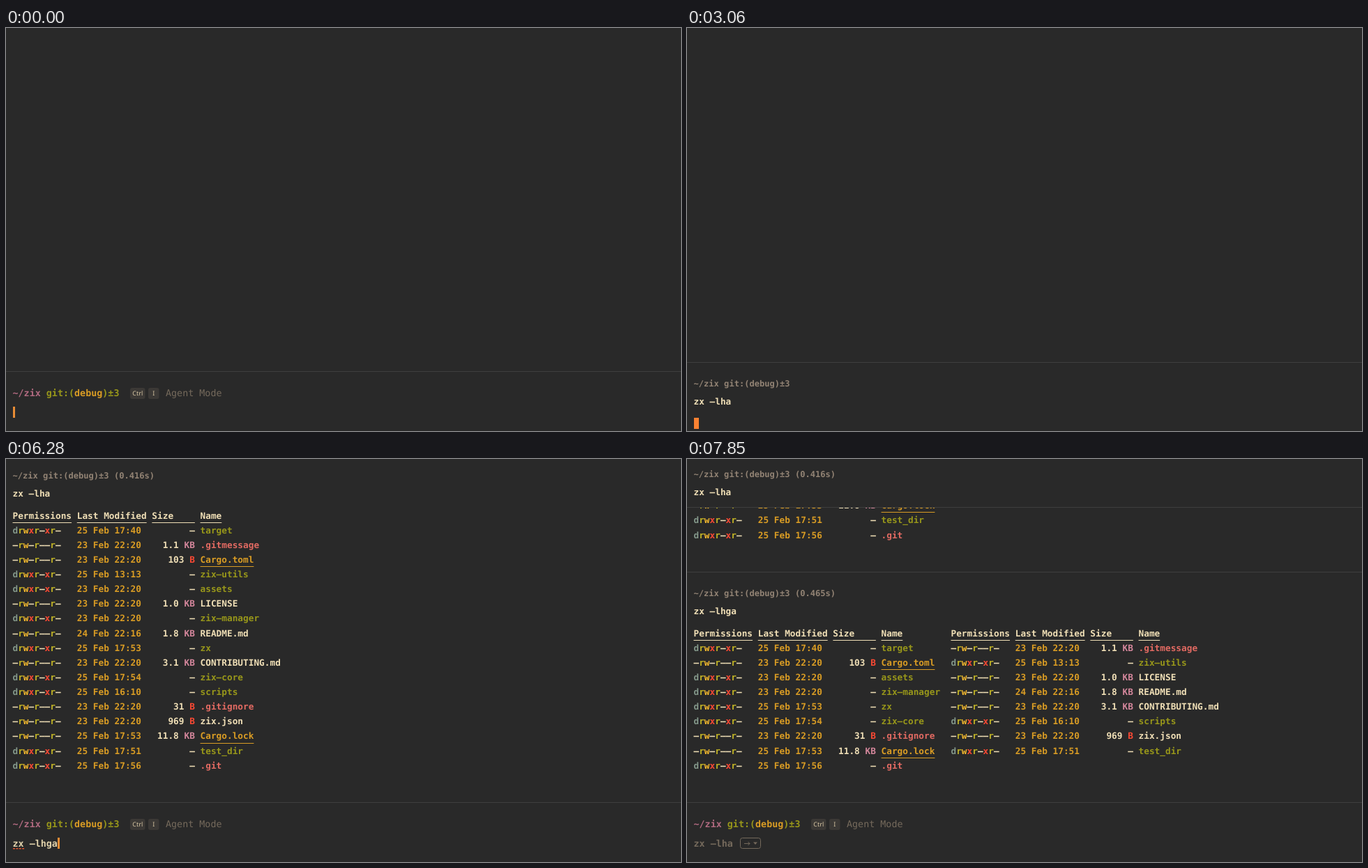
An HTML page with a canvas for the animation above (8 s loop, 968 px wide and 579 px high).

```html
<!DOCTYPE html>
<html lang="en">
<head>
<meta charset="utf-8">
<title>Terminal</title>
<style>
html, body { margin: 0; width: 100%; height: 100%; overflow: hidden; background: #292929; }
canvas { display: block; width: 100vw; height: 100vh; }
</style>
</head>
<body>
<canvas id="stage" width="968" height="579"></canvas>
<script>
const ctx = document.getElementById('stage').getContext('2d');
const W = 968, H = 579, LOOP = 8000, LEFT = 9.5;
const ROW = 21.12, CELL = 7.687, INPUT_CELL = 8.05;
const INPUT_TOP = 493, HEAD = 88, STICKY = 69;
const BG = '#292929', LINE = '#3e3e3e', CREAM = '#f0dfb6', GREY = '#756a5c', TITLE = '#928374',
  GOLD = '#d99c24', OLIVE = '#98971a', RED = '#fb4934', SALMON = '#e26a62', PINK = '#d3869b',
  MAUVE = '#b16a80', ORANGE = '#e88c35';
const PERM = { d: '#83978a', r: '#bdb026', w: '#f5ba2e', x: RED, '-': CREAM };

const files = `d|25 Feb 17:40|-|target
-|23 Feb 22:20|1.1 KB|.gitmessage
-|23 Feb 22:20|103 B|Cargo.toml
d|25 Feb 13:13|-|zix-utils
d|23 Feb 22:20|-|assets
-|23 Feb 22:20|1.0 KB|LICENSE
d|23 Feb 22:20|-|zix-manager
-|24 Feb 22:16|1.8 KB|README.md
d|25 Feb 17:53|-|zx
-|23 Feb 22:20|3.1 KB|CONTRIBUTING.md
d|25 Feb 17:54|-|zix-core
d|25 Feb 16:10|-|scripts
-|23 Feb 22:20|31 B|.gitignore
-|23 Feb 22:20|969 B|zix.json
-|25 Feb 17:53|11.8 KB|Cargo.lock
d|25 Feb 17:51|-|test_dir
d|25 Feb 17:56|-|.git`.split('\n').map(s => s.split('|'));

const rect = (x, y, w, h, color) => { ctx.fillStyle = color; ctx.fillRect(x, y, w, h); };
const rule = y => rect(0, Math.round(y), W, 1, LINE);

// Monospaced text on a fixed grid, centred vertically on y
function mono(s, x, y, color, cell = CELL, weight = 'bold') {
  const size = cell / 0.602;
  ctx.font = `${weight} ${size}px "DejaVu Sans Mono", monospace`;
  ctx.fillStyle = color;
  const base = Math.round(y + size * 0.364);
  [...s].forEach((c, i) => {
    if (c !== ' ') ctx.fillText(c === '-' ? '–' : c, x + i * cell, base);
  });
}

const put = (s, col, y, color) => mono(s, LEFT + col * CELL, y, color);
const underline = (col, n, y, color) =>
  rect(LEFT + col * CELL, Math.round(y + 9.8), n * CELL, 1, color);

function header(col, y) {
  [['Permissions', 0, 11], ['Last Modified', 12, 13], ['Size', 26, 8], ['Name', 35, 4]]
    .forEach(([s, c, n]) => {
      put(s, col + c, y, CREAM);
      underline(col + c, n, y, CREAM);
    });
}

function entry([kind, date, size, name], col, y) {
  const dir = kind === 'd', cargo = name.startsWith('Cargo');
  [...(dir ? 'drwxr-xr-' : '-rw-r--r-')].forEach((c, i) => put(c, col + i, y, PERM[c]));
  put(date, col + 12, y, GOLD);
  const [num, unit = ''] = size.split(' ');
  put(num, col + 34 - size.length, y, CREAM);
  put(unit, col + 34 - unit.length, y, unit === 'B' ? RED : PINK);
  put(name, col + 35, y, name[0] === '.' ? SALMON : dir ? OLIVE : cargo ? GOLD : CREAM);
  if (cargo) underline(col + 35, name.length, y, GOLD);
}

const rowsIn = cols => Math.ceil(files.length / cols);
const doneTop = (bottom, cols) => bottom - 53 - rowsIn(cols) * ROW - HEAD;
const runTop = (cols, out) => 568 - (out ? (rowsIn(cols) + 2) * ROW : 0) - HEAD;

function block(top, cmd, cols, out, time) {
  const y = top + HEAD;
  if (out) {
    for (let c = 0; c < cols; c++) header(c * 48, y);
    files.forEach((f, i) => entry(f, i % cols * 48, y + (1 + Math.floor(i / cols)) * ROW));
  }
  let titleY = top + 30.5;
  if (top < -9) {
    rect(0, 0, W, STICKY, BG);
    rule(STICKY);
    titleY = 21.5;
  } else rule(top);
  mono('~/zix git:(debug)±3' + (time ? ` (${time})` : ''), LEFT, titleY, TITLE, 7.27);
  put(cmd, 0, titleY + 26, CREAM);
}

function key(s, x, w) {
  ctx.fillStyle = '#3c3936';
  ctx.beginPath();
  ctx.roundRect(x, 517, w, 16, 3);
  ctx.fill();
  ctx.font = '9px "Noto Sans", sans-serif';
  ctx.fillStyle = '#d5c4a1';
  ctx.textAlign = 'center';
  ctx.fillText(s, x + w / 2, 528);
  ctx.textAlign = 'left';
}

function chip(x) {
  ctx.strokeStyle = ctx.fillStyle = GREY;
  ctx.lineWidth = 1;
  ctx.beginPath();
  ctx.roundRect(x + .5, 544.5, 29, 15, 3);
  ctx.moveTo(x + 6, 552.5);
  ctx.lineTo(x + 14, 552.5);
  ctx.moveTo(x + 11.5, 550);
  ctx.lineTo(x + 14, 552.5);
  ctx.lineTo(x + 11.5, 555);
  ctx.stroke();
  ctx.beginPath();
  ctx.moveTo(x + 19, 550.5);
  ctx.lineTo(x + 25, 550.5);
  ctx.lineTo(x + 22, 554);
  ctx.fill();
}

function prompt(cmd, typed, ghost, cursor) {
  rule(INPUT_TOP);
  let col = 0;
  [['~/zix ', MAUVE], ['git:(', OLIVE], ['debug', GOLD], [')±3', OLIVE]].forEach(([s, color]) => {
    mono(s, LEFT + col * INPUT_CELL, 524.3, color, INPUT_CELL);
    col += s.length;
  });
  key('Ctrl', 178, 21.5);
  key('I', 204, 15.5);
  mono('Agent Mode', 229, 524.3, GREY, INPUT_CELL, 'normal');

  mono(cmd.slice(0, typed), LEFT, 552, '#e2d3ac', INPUT_CELL);
  if (ghost && typed < cmd.length) {
    mono(cmd.slice(typed), LEFT + typed * INPUT_CELL, 552, GREY, INPUT_CELL);
    chip(Math.round(LEFT + cmd.length * INPUT_CELL + 10));
  }
  if (typed) {
    ctx.strokeStyle = '#e0562f';
    ctx.lineWidth = 1.4;
    ctx.setLineDash([3, 1.4]);
    ctx.beginPath();
    ctx.moveTo(10, 559.7);
    ctx.lineTo(10 + Math.min(typed, 2) * INPUT_CELL, 559.7);
    ctx.stroke();
    ctx.setLineDash([]);
  }
  if (cursor) rect(Math.round(10 + typed * INPUT_CELL), 544, 3, 16, ORANGE);
}

const first = { cmd: 'zx -lha', time: '0.416s', cols: 1, run: 2800, caret: 3060, out: 3190, done: 3260,
  keys: [550, 620, 1150, 1500, 1750, 2080, 2340] };
const second = { cmd: 'zx -lhga', time: '0.465s', cols: 2, run: 6610, caret: 6830, out: 7030, done: 7100,
  keys: [4170, 4500, 4830, 5100, 5430, 5760, 6020, 6280] };

function draw(t) {
  rect(0, 0, W, H, BG);
  let bottom = INPUT_TOP, busy = false;
  for (const c of [second, first]) {
    if (t < c.run) continue;
    const done = t >= c.done, out = t >= c.out;
    const top = done ? doneTop(bottom, c.cols) : runTop(c.cols, out);
    block(top, c.cmd, c.cols, out, done && c.time);
    if (!done) {
      busy = true;
      if (t >= c.caret) rect(10, 560, 7, 16, '#fa8232');
    }
    bottom = top;
  }
  if (busy) return;
  const count = keys => keys.filter(k => t >= k).length;
  if (t < first.run) prompt(first.cmd, count(first.keys), t >= 550, true);
  else if (t < second.run) prompt(second.cmd, count(second.keys), t >= 3830, t < 3760 || t >= 4170);
  else prompt(first.cmd, 0, t >= 7850, t < 7580);
}

ctx.textRendering = 'geometricPrecision';
const start = performance.now();
function frame() {
  draw((performance.now() - start) % LOOP);
  requestAnimationFrame(frame);
}
frame();
</script>
</body>
</html>
```
